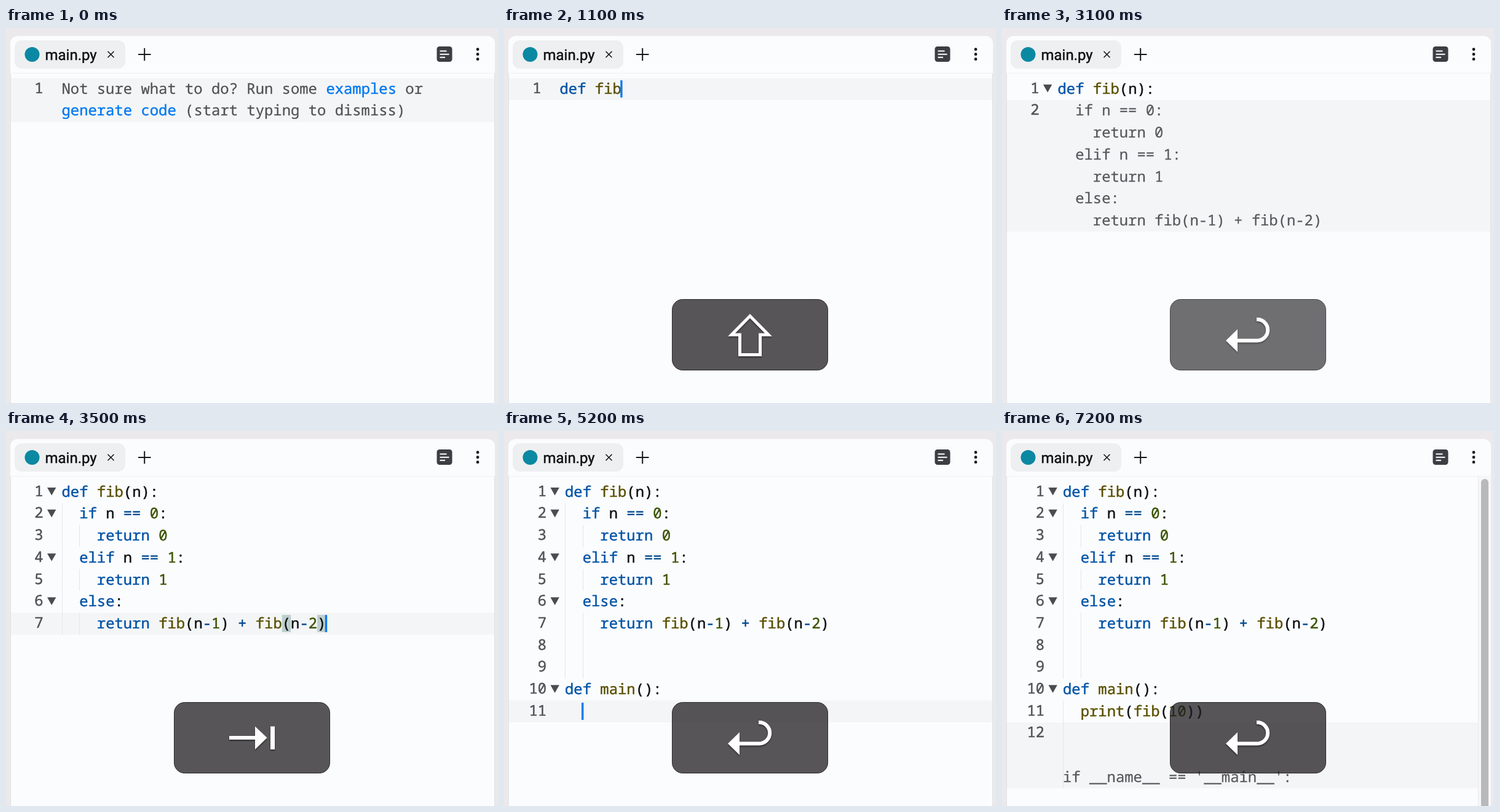
An HTML page for the animation above (7.4 s loop, 800 by 610 pixels).

```html
<!DOCTYPE html>
<html lang="en">
<head>
<meta charset="utf-8">
<title>Code editor with completions</title>
<style>
  html, body { margin: 0; width: 100%; height: 100%; overflow: hidden; background: #ebe9ec; }
  svg { display: block; }
  text {
    text-rendering: geometricPrecision; white-space: pre;
    color: #0f1012; fill: currentColor; stroke: currentColor; stroke-width: .45;
  }
  #view text { font: 23.88px "Noto Sans Mono", "DejaVu Sans Mono", monospace; }
  #view .kw { color: #0053a6; }
  #view .op { color: #00488f; }
  #view .fn { color: #5a5000; }
  #view .num { color: #3a5200; }
  #view .ghost { color: #56585b; stroke-width: .25; }
  #view .hint { color: #505154; stroke-width: .25; }
  #view .link { color: #0079f2; }
  #view .line-no { color: #505155; text-anchor: end; }
  #view .key-char { font: 500 88px Inter, sans-serif; color: #fff; }
  .name { font: 24px Roboto, sans-serif; }
  .stroke { fill: none; stroke: #161719; }
  .key { filter: drop-shadow(0 2px 1px rgba(0, 0, 0, .45)); }
</style>
</head>
<body>
<svg width="800" height="610" viewBox="0 0 800 610">
  <rect width="800" height="610" fill="#ebe9ec"/>
  <path d="M7 610V25a12 12 0 0 1 12-12H783a12 12 0 0 1 12 12V610z" fill="#fbfcfe"/>
  <path d="M7 73.5H795" stroke="#f0f1f3"/>
  <path d="M7.5 74V610M794.5 74V610" stroke="#e1e1e4"/>
  <rect x="14" y="20" width="180" height="46" rx="12" fill="#eeeff1"/>
  <circle cx="42.5" cy="43" r="12" fill="#0b88a2"/>
  <text class="name" x="63.5" y="51.5">main.py</text>
  <path class="stroke" d="M165.5 38l10 10m0-10l-10 10" stroke-width="1.6"/>
  <path class="stroke" d="M215 43h20.5M225.2 32.8v20.5" stroke-width="2"/>
  <rect x="700.5" y="30" width="25" height="25" rx="4.5" fill="#3d3e43"/>
  <path d="M705.5 37.6h11M705.5 42.7h15M705.5 47.8h8.5" stroke="#fff" stroke-width="2"/>
  <g fill="#161719">
    <circle cx="767" cy="34.7" r="2.4"/><circle cx="767" cy="42.7" r="2.4"/><circle cx="767" cy="50.7" r="2.4"/>
  </g>
  <g id="view"></g>
</svg>
<script>
const LOOP = 7400;
const CHAR = 14.33, TOP = 81.6, ROW = 35.68, LEFT = 90.5;

const script = [
  'def fib(n):',
  '  if n == 0:',
  '    return 0',
  '  elif n == 1:',
  '    return 1',
  '  else:',
  '    return fib(n-1) + fib(n-2)',
  '    ',
  '',
  'def main():',
  '  print(fib(10))',
  '  '
];
const upTo = n => script.slice(0, n);
const opened = n => [...upTo(n), '  '];

// Each step changes only the listed parts of the state.
const steps = [
  [0, { code: [''], hint: true, caret: 0, ghost: [], key: '', alpha: 0 }],
  [100, { hint: false, code: ['d'], caret: 1 }],
  [300, { code: ['de'] }],
  [400, { code: ['def'] }],
  [500, { code: ['def '] }],
  [700, { code: ['def f'] }],
  [800, { code: ['def fi'] }],
  [900, { code: ['def fib'] }],
  [1000, { key: 'shift', alpha: .5 }],
  [1100, { alpha: 1 }],
  [1700, { code: ['def fib(n'], key: 'shift9' }],
  [1800, { code: upTo(1), key: 'shift;' }],
  [2100, { key: 'enter' }],
  [2200, { code: opened(1) }],
  [2400, { ghost: ['if n == 0:', ...script.slice(2, 7)] }],
  [2600, { caret: .6 }],
  [2800, { caret: 0 }],
  [3100, { alpha: .85 }],
  [3200, { alpha: .55 }],
  [3300, { alpha: .25 }],
  [3400, { alpha: 0 }],
  [3500, { key: 'tab', alpha: 1, code: upTo(7), ghost: [], caret: 1 }],
  [3700, { key: 'enter' }],
  [3800, { code: upTo(8) }],
  [4000, { ghost: ['', '', 'def main():'] }],
  [4300, { caret: 0 }],
  [4700, { key: 'tab', code: upTo(10), ghost: [], caret: 1 }],
  [5100, { key: 'enter' }],
  [5200, { code: opened(10) }],
  [5400, { ghost: ['print(fib(10))'] }],
  [5700, { caret: .4 }],
  [5800, { caret: 0 }],
  [6100, { alpha: .85 }],
  [6200, { alpha: .55 }],
  [6300, { alpha: .25 }],
  [6400, { alpha: 0 }],
  [6500, { key: 'tab', alpha: 1, code: upTo(11), ghost: [], caret: 1 }],
  [6700, { key: 'enter' }],
  [6800, { code: upTo(12) }],
  [7000, { ghost: ['', '', "if __name__ == '__main__':"] }],
  [7200, { caret: 0 }]
];

const rowY = row => TOP + row * ROW;
const indent = line => line.search(/\S|$/);
const esc = s => s.replace(/&/g, '&amp;').replace(/</g, '&lt;');
const rect = (x, y, w, h, fill, more = '') =>
  `<rect x="${x}" y="${y}" width="${w}" height="${h}" fill="${fill}" ${more}/>`;

function put(left, row, col, str, cls = '') {
  return `<text class="${cls}" x="${left + col * CHAR}" y="${rowY(row) + 25.2}">${esc(str)}</text>`;
}

const token = /\b(def|if|elif|else|return)\b|\b(f|fi|fib|main|print)\b|(\d+)|(==|[+-])|[^\s\w=+-]+|\w+/g;
function colored(left, row, line) {
  return [...line.matchAll(token)].map(m => {
    const cls = m[1] ? 'kw' : m[2] ? 'fn' : m[3] ? 'num' : m[4] ? 'op' : '';
    return put(left, row, m.index, m[0], cls);
  }).join('');
}

function plain(left, row, col, line, cls) {
  const skip = indent(line);
  return put(left, row, col + skip, line.slice(skip), cls);
}

// Columns of the closing bracket before the caret and of its partner.
function brackets(line) {
  if (!line.endsWith(')')) return [];
  let depth = 0, i = line.length;
  do {
    i--;
    depth += line[i] === ')' ? 1 : line[i] === '(' ? -1 : 0;
  } while (depth);
  return [i, line.length - 1];
}

function guides(left, code, extra) {
  let out = '', last = 0;
  code.forEach((line, row) => {
    if (line.trim()) last = indent(line);
    const end = row === code.length - 1 ? row + 1 + extra : row + 1;
    for (let col = 0; col < last; col += 2)
      out += rect(Math.round(left + col * CHAR), rowY(row), 1, rowY(end) - rowY(row), '#e4e6e8');
  });
  return out;
}

const shift = x => `<path transform="translate(${x})" fill="none" stroke="#fff" stroke-width="5"
  d="M400 468.5L370 499H383.5V531.5H416.5V499H430z"/>`;
const glyph = {
  shift: () => shift(0),
  enter: () => `<path fill="none" stroke="#fff" stroke-width="6" d="M382 508.5H415a17.2 17.2 0 0 0 0-34.4h-1"/>
    <path fill="#fff" d="M364 508.5L383 490V527z"/>`,
  tab: () => '<path fill="#fff" d="M363 496H405V480.5L424.5 499L405 518V502H363zM430 480.5h7v37.5h-7z"/>'
};
function drawKey(key, alpha) {
  if (!key || !alpha) return '';
  const mark = glyph[key] ? glyph[key]()
    : shift(-46) + `<text class="key-char" x="452" y="532" text-anchor="middle">${key.slice(-1)}</text>`;
  return `<g opacity="${alpha}">` +
    rect(273.5, 441.5, 253, 115, 'rgba(30,27,31,.74)', 'rx="17" stroke="#2b2a2d"') +
    `<g class="key">${mark}</g></g>`;
}

function draw({ code, hint, caret, ghost, key, alpha }) {
  const shiftX = code.length > 9 ? 8.5 : 0;
  const left = LEFT + shiftX;
  const row = code.length - 1, line = code[row], col = line.length;
  const scroll = code.length > 11;
  const rows = hint ? 2 : Math.max(1, ghost.length);
  let out = rect(8, rowY(row), scroll ? 766 : 786, rows * ROW, '#f4f5f6');

  out += guides(left, code, rows - 1);
  for (const c of brackets(line))
    out += rect(left + c * CHAR, rowY(row) + 3.5, CHAR, 28, '#bccfce');

  code.forEach((text, i) => {
    const y = rowY(i);
    out += `<text class="line-no" x="${60.7 + shiftX}" y="${y + 24.2}">${i + 1}</text>`;
    if (text.endsWith(':') && i < row && indent(code[i + 1]) > indent(text))
      out += `<path fill="#4b4c50" d="M${67 + shiftX} ${y + 10.5}h14.4l-7.2 12.7z"/>`;
    out += colored(left, i, text);
  });

  ghost.forEach((text, i) => { out += plain(left, row + i, i ? 0 : col, text, 'ghost'); });

  if (hint) {
    out += put(left, 0, 0, 'Not sure what to do? Run some', 'hint') +
      put(left, 0, 30, 'examples', 'link') + put(left, 0, 39, 'or', 'hint') +
      put(left, 1, 0, 'generate code', 'link') +
      put(left, 1, 14, '(start typing to dismiss)', 'hint');
  }
  if (caret)
    out += rect(left + col * CHAR - 1.6, rowY(row) + 3.5, 3.4, 28, '#0a7bf0', `opacity="${caret}"`);
  if (scroll) {
    out += rect(774, 74, 21, 536, '#f7f7f9') + rect(774, 74, 1, 536, '#e9e9ec') +
      rect(779, 78, 12, 545, '#b9b8bb', 'rx="6"');
  }
  return out + drawKey(key, alpha);
}

const view = document.getElementById('view');
const start = performance.now();
let shown = 0;
function tick() {
  const t = (performance.now() - start) % LOOP;
  const count = steps.filter(([at]) => at <= t).length;
  if (count !== shown) {
    view.innerHTML = draw(Object.assign({}, ...steps.slice(0, count).map(s => s[1])));
    shown = count;
  }
  requestAnimationFrame(tick);
}
tick();
</script>
</body>
</html>
```
